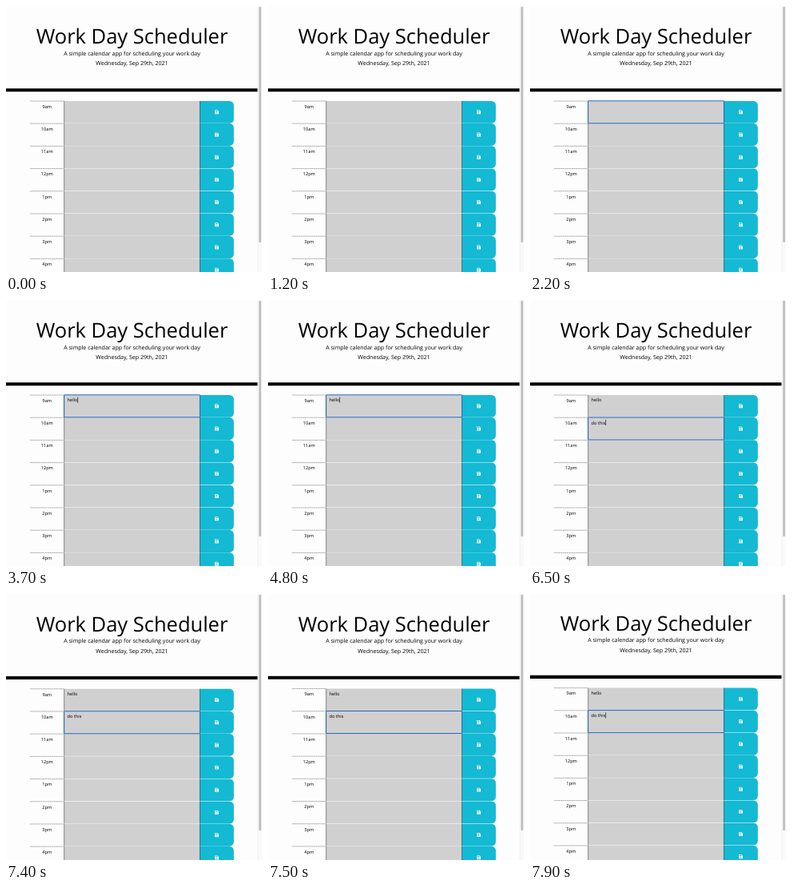
An HTML page that plays this animation: 320x333 px, repeating every 8 s.

```html
<!DOCTYPE html>
<html lang="en">
<head>
<meta charset="utf-8">
<title>Work Day Scheduler</title>
<style>
  html, body { margin: 0; width: 100%; height: 100%; overflow: hidden; background: #fefdfe; }
  svg { display: block; width: 100%; height: 100%; }
  text { font: 5.67px "Open Sans", sans-serif; white-space: pre; text-rendering: geometricPrecision; }
  .mid { text-anchor: middle; }
  .title { font-size: 25.5px; }
  .lead { font-size: 7.09px; }
</style>
</head>
<body>
<svg viewBox="0 0 320 333">
  <defs>
    <g id="row">
      <path d="M30.1 .5H72.5" stroke="#444" stroke-width=".6" stroke-dasharray="1.06 .7"/>
      <path d="M72.5 .4H242.2V28.2H72.5z" fill="#d1d0d1"/>
      <path d="M242.2 .4H279.5a5.3 5.3 0 0 1 5.3 5.3V22.9a5.3 5.3 0 0 1-5.3 5.3H242.2z" fill="#14b9d3"/>
      <path d="M72.7 .4V28.2M242.4 .4V28.2" stroke="#000" stroke-width=".4"/>
      <!-- save icon -->
      <g transform="translate(261 11.8) scale(.01103)">
        <path d="M48 0H316L448 132V400a48 48 0 0 1-48 48H48a48 48 0 0 1-48-48V48A48 48 0 0 1 48 0z" fill="#fff"/>
        <path d="M64 64H320V160H64z" fill="#14b9d3"/>
        <circle cx="224" cy="320" r="64" fill="#14b9d3"/>
      </g>
    </g>
  </defs>
  <g id="page">
    <text class="mid title" x="157.5" y="47">Work Day Scheduler</text>
    <text class="mid lead" x="157.5" y="61.7">A simple calendar app for scheduling your work day</text>
    <text class="mid lead" x="157.5" y="74.4">Wednesday, Sep 29th, 2021</text>
    <path d="M0 103.2H314.7V107.3H0z"/>
    <g id="rows"></g>
    <rect id="ring" x="72.5" width="170" height="28" rx=".5" fill="none" stroke="#2269c4"/>
    <path id="caret" stroke="#000" stroke-width=".6"/>
  </g>
  <path d="M314.7 0H320V333H314.7z" fill="#fafafa"/>
  <path d="M314.9 0V333" stroke="#e6e6e6" stroke-width=".4"/>
  <rect x="316.1" y=".7" width="2.9" height="295.6" rx="1.45" fill="#c1c1c1"/>
</svg>
<script>
const $ = id => document.getElementById(id);
const TOP = 118.5, PITCH = 28.2, LOOP = 8000;
const rowY = i => TOP + i * PITCH;

$('rows').innerHTML = ['9am', '10am', '11am', '12pm', '1pm', '2pm', '3pm', '4pm'].map((hour, i) =>
  `<g transform="translate(0 ${rowY(i)})"><use href="#row"/>
   <text class="mid" x="51.3" y="9.4">${hour}</text><text class="note" x="76.5" y="8.9"></text></g>`).join('');
const notes = document.querySelectorAll('.note');

// [time, row, typed text]; every entry restarts the caret's blink
const edits = [
  [1700, 0, ''], [2800, 0, 'h'], [2900, 0, 'he'], [3500, 0, 'hell'], [3700, 0, 'hello'],
  [5000, 1, ''], [5800, 1, 'd'], [6100, 1, 'do'], [6200, 1, 'do '], [6300, 1, 'do t'],
  [6400, 1, 'do thi'], [6500, 1, 'do this'], [7600, 1, 'do this']
];

function draw(t) {
  const typed = ['', ''];
  let last = null;
  for (const edit of edits) {
    if (edit[0] > t) break;
    last = edit;
    typed[edit[1]] = edit[2];
  }
  typed.forEach((s, i) => { if (notes[i].textContent !== s) notes[i].textContent = s; });

  $('ring').style.display = last ? '' : 'none';
  let caretOn = false;
  if (last) {
    const [start, row, text] = last, y = rowY(row);
    $('ring').setAttribute('y', y + .3);
    const x = 76.7 + (text ? notes[row].getComputedTextLength() : 0);
    $('caret').setAttribute('d', `M${x} ${y + 2.9}v7.4`);
    const hidden = t >= 7500 && t < 7600;
    caretOn = !hidden && Math.floor((t - start) / 500) % 2 === 0;
  }
  $('caret').style.display = caretOn ? '' : 'none';

  const scroll = Math.max(0, t - 7300) / 600 * 1.4;
  $('page').setAttribute('transform', `translate(0 ${-scroll})`);
}

function tick() {
  draw(Math.floor(performance.now() % LOOP / 100) * 100);
  requestAnimationFrame(tick);
}
tick();
</script>
</body>
</html>
```
